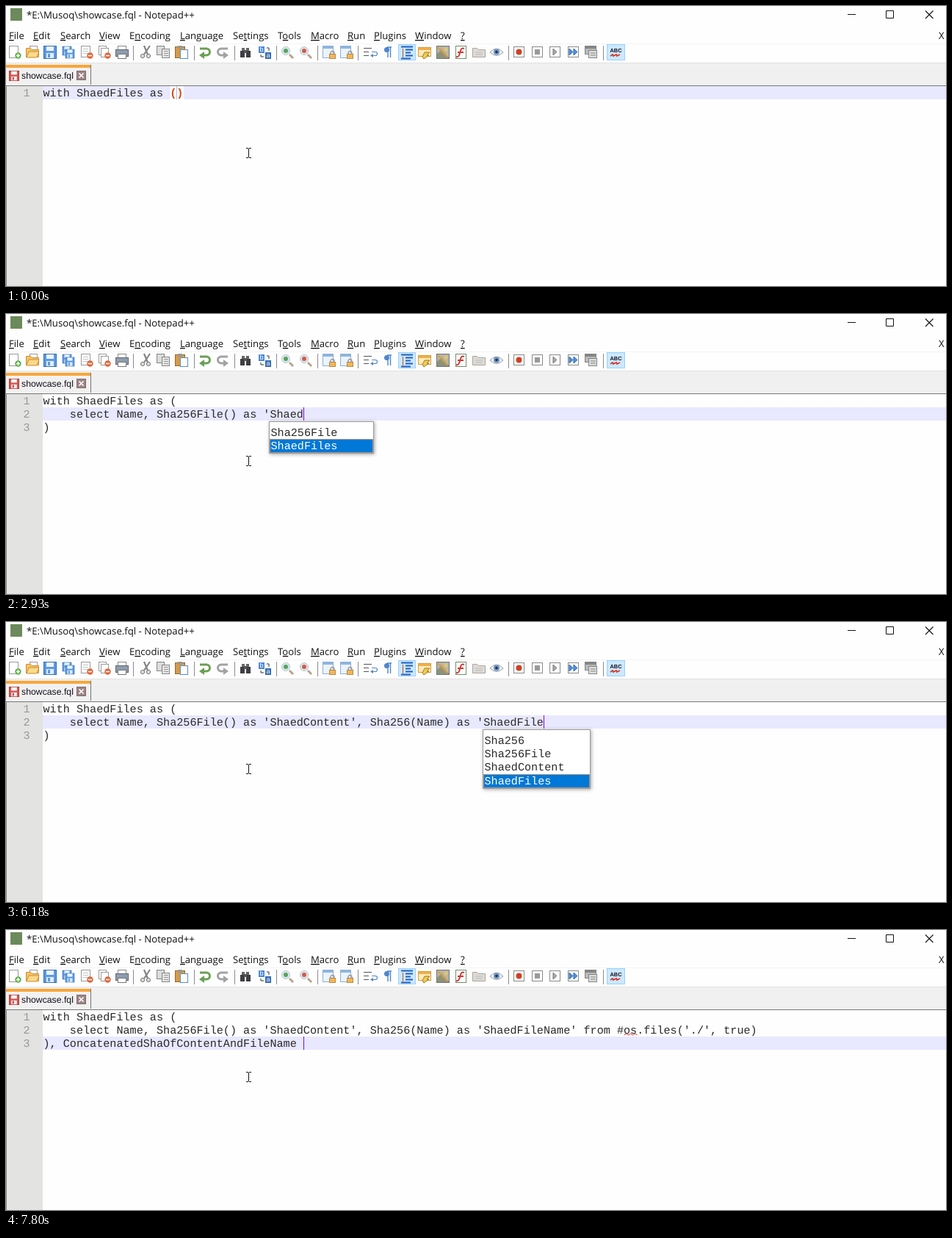
An HTML page that plays this animation: 1280x381 px, repeating every 8 s.

```html
<!DOCTYPE html>
<html lang="en">
<head>
<meta charset="utf-8">
<title>Typing a query</title>
<style>
  html, body { margin: 0; width: 100%; height: 100%; overflow: hidden; background: #fefefe; }
  svg { display: block; width: 1280px; height: 381px; }
  text { white-space: pre; text-rendering: geometricPrecision; }
  .ui { font: 13.1px "Open Sans", sans-serif; fill: #111; }
  .tab { font: 12.28px "Liberation Sans", sans-serif; fill: #15101c; }
  .code { font: 15.15px "Liberation Mono", monospace; fill: #2a2a2a; }
  .code.num { fill: #989898; }
  .code.brace { font-weight: bold; }
  .code.picked { fill: #fff; }
  .list { filter: drop-shadow(1px 1px 2.5px rgba(0, 0, 0, .35)); }
</style>
</head>
<body>
<svg viewBox="0 0 1280 381">
  <g id="chrome"></g>
  <g id="editor"></g>
  <path d="M327 193.5h3M331 193.5h3M330.5 194v12M327 206.5h3M331 206.5h3" fill="none" stroke="#111"/>
</svg>
<script>
const rect = (x, y, w, h, fill, stroke = 'none', more = '') =>
  `<rect x="${x}" y="${y}" width="${w}" height="${h}" fill="${fill}" stroke="${stroke}" ${more}/>`;
const path = (d, stroke, width = 1, fill = 'none') =>
  `<path d="${d}" fill="${fill}" stroke="${stroke}" stroke-width="${width}"/>`;
const shape = (d, fill, stroke = 'none') => path(d, stroke, 1, fill);
const dot = (x, y, r, fill, stroke = 'none') =>
  `<circle cx="${x}" cy="${y}" r="${r}" fill="${fill}" stroke="${stroke}"/>`;
const text = (x, y, s, cls, more = '') => `<text x="${x}" y="${y}" class="${cls}" ${more}>${s}</text>`;
const move = (x, y, s, scale = 1) => `<g transform="translate(${x} ${y}) scale(${scale})">${s}</g>`;

// ---- toolbar icons, each drawn around its own centre ----
const page = (x, y, w = 11, h = 14, c = '#9a9a9a', fill = '#fff') => rect(x + .5, y + .5, w, h, fill, c);
const lines = (x, y, w, n, c) => path(Array.from({ length: n }, (_, i) => `M${x} ${y + i * 3}h${w}`).join(''), c);
const disk = (c, edge) => rect(-8.5, -8.5, 17, 17, c, edge) + rect(-5, -8, 10, 6, '#eef4fb') + rect(-5, 1, 10, 7, '#e3ecf6') + rect(-3, 2, 3, 5, c);
const badge = (c, d) => dot(4.5, 4.5, 4.2, c) + path(d, '#fff', 1.6);
const folder = (c, edge) => shape('M-8.5 -5.5h6l2 2h9v10h-17z', c, edge);
const arrow = c => path('M-7 -5H2a4.3 4.3 0 0 1 0 9H-3', c, 3) + shape('M-1 -1v10l-7-5z', c);
const lens = c => path('M3 3l5 5', '#b5a58e', 3) + dot(-2, -2, 5.5, '#dbe7f0', '#b9c6d0') + dot(-2, -2, 3, c);
const lock = rect(-8.5, -8.5, 14, 16, '#eaf3fd', '#8fb0d4') + rect(-8, -8, 13, 3, '#8db5e0') +
  path('M2 3v-2a2.500 2.500 0 0 1 5 0v2', '#999', 1.4) + rect(.5, 2.5, 8, 6, '#f2b65a', '#b98a45');
const key = rect(-7.5, -7.5, 14, 14, '#fcfcfc', '#8b8b8b');
const small = (x, y, s, size, more = '') => text(x, y, s, 'tab', `style="font-size:${size}px;${more}"`);

const icons = [
  [12, page(-8, -9, 12, 16) + badge('#5db14a', 'M2 4.5h5M4.5 2v5')],
  [36, page(-4, -9, 10, 10) + folder('#f4c565', '#c98e35') + shape('M-5 -1h14l-3 8h-14z', '#fbd98a', '#c98e35')],
  [60, disk('#5b9be0', '#2f6fb8')],
  [85, move(-2, -2, disk('#5b9be0', '#2f6fb8'), .7) + move(2, 2, disk('#5b9be0', '#2f6fb8'), .7)],
  [110, page(-8, -9, 12, 15) + lines(-5, -4.5, 7, 3, '#c4c4c4') + badge('#e2663a', 'M2 4.5h5')],
  [134, page(-8, -9, 10, 12) + page(-5, -6, 10, 12) + badge('#e2663a', 'M2 4.5h5')],
  [158, rect(-5.5, -8.5, 11, 7, '#fff', '#888') + rect(-8.5, -3.5, 17, 9, '#8e9cac', '#5d6874') + rect(-5.5, 2.5, 11, 6, '#fff', '#777')],
  [190, path('M-2 -9l5 12M6 -9l-8 12', '#858585', 2.2) + dot(-4, 5, 2.6, '#ddd', '#777') + dot(4, 5, 2.6, '#ddd', '#777')],
  [214, page(-9, -9, 10, 12, '#858585', '#ddd') + page(-2, -5, 10, 12, '#858585', '#e6e6e6') + lines(1, -1.5, 6, 3, '#999')],
  [239, rect(-8.5, -7.5, 13, 15, '#d39b4d', '#9a6826') + rect(-5, -9, 6, 4, '#999') + page(-2, -4, 10, 12, '#5b8fc9')],
  [271, arrow('#699f52')],
  [295, `<g transform="scale(-1 1)">${arrow('#a2a2a2')}</g>`],
  [326, rect(-7, -2, 6, 9, '#3d3d42') + rect(1, -2, 6, 9, '#3d3d42') + rect(-5, -6, 4, 4, '#666') + rect(1, -6, 4, 4, '#666') + rect(-2, -3, 4, 4, '#555')],
  [352, rect(-8, -8, 8, 9, '#4b8ad2') + rect(1, 0, 8, 9, '#326db6') + small(-6.5, -1, 'b', 9, 'fill:#fff') + small(2.5, 7, 'a', 9, 'fill:#fff') + path('M-5 3v3h4M3 -6h3v4', '#333')],
  [383, lens('#58a554')],
  [408, lens('#d75a45')],
  [440, lock],
  [464, lock],
  [496, path('M-9 -5.5h11M-9 -.5h7M-9 4.5h7', '#555') + path('M2 -.5h5a2.5 2.5 0 0 1 0 5H2', '#5588c4', 1.2) + shape('M4 2v5l-4-2.5z', '#5588c4')],
  [520, path('M0 -7v14M3.5 -7v14M-1 -7h6', '#4d86cb', 1.4) + dot(-1.5, -3.5, 3.5, '#4d86cb')],
  [546, path('M-8 -7.5h16M-2 -3.5h10M-2 .5h7M-2 4.5h10M-8 8.5h13', '#235fc0', 2) + path('M-5.5 -5v12', '#c34a3c')],
  [570, rect(-8.5, -6.5, 17, 12, '#fdebb9', '#d99b3a') + rect(-8, -6, 16, 3, '#f0b04b') + shape('M-3 6l3-6h7l-4 4h3l-7 5z', '#f2cd4c', '#9b7a2e')],
  [595, rect(-8.5, -8.5, 17, 17, '#b4b7ab', '#737373') + shape('M-8 8V2l6-6 10 11v1z', '#8d9379') + path('M-7 -7l13 13', '#e59a3c', 2) + dot(4, -4, 2.5, '#e5c56a')],
  [619, page(-7, -9, 14, 17, '#6f8f6b') + path('M5 -5q-4-2-5 3l-2 6q-1 3-4 2M-4 0h8', '#d1372f', 2)],
  [644, folder('#dedbd6', '#aaa49c') + lines(-5, 0, 10, 2, '#bbb')],
  [668, shape('M-9 0q9-10 18 0q-9 9-18 0z', '#eef1f4', '#9b9b9b') + dot(0, -.5, 4, '#6a94c4') + dot(0, -.5, 1.8, '#1d2f4b')],
  [699, key + dot(-.5, -.5, 4, '#cf4123')],
  [724, key + rect(-4, -4, 7, 7, '#999')],
  [748, key + shape('M-3 -5l5 4.5-5 4.5z', '#aaa', '#777')],
  [773, key + shape('M-6 -5l5 4.5-5 4.5zM0 -5l5 4.5-5 4.5z', '#4f8fdc', '#2c67b0')],
  [797, rect(-8.5, -8.5, 15, 11, '#bbb', '#858585') + rect(-8, -8, 14, 3, '#858585') + rect(-3.5, -2.5, 11, 10, '#ddd', '#858585') + lines(-1, 1, 7, 2, '#888')],
  [830, small(-7.5, 0, 'ABC', 7.4, 'font-weight:bold') + path('M-7 5l3-2 1 2 4-2 1 2 4-2', '#d33a2f', 1.8)],
];

// label, left edge, index of the underlined letter
const menu = [['File', 4, 0], ['Edit', 37, 0], ['Search', 74, 0], ['View', 127, 0], ['Encoding', 168, 1],
  ['Language', 237, 0], ['Settings', 309, 2], ['Tools', 370, 1], ['Macro', 415, 0], ['Run', 465, 0],
  ['Plugins', 501, 0], ['Window', 557, 0], ['?', 619, 0]];

const underline = (s, i) =>
  `${s.slice(0, i)}<tspan text-decoration="underline">${s[i]}</tspan>${s.slice(i + 1)}`;

document.getElementById('chrome').innerHTML =
  rect(6, 3, 16, 17, '#6d8a5c') +
  text(28, 17, '*E:\\Musoq\\showcase.fql - Notepad++', 'ui', 'style="font-size:13.2px"') +
  path('M1146 11.5h11M1198.5 6.5h10v10h-10z', '#111') + path('M1252 6.5l10.5 10.5M1262.5 6.5l-10.5 10.5', '#111', 1.1) +
  menu.map(([s, x, i]) => text(x, 45, underline(s, i), 'ui')).join('') +
  text(1270, 45, 'X', 'ui') +
  path('M0 51.5h1280', '#f3f3f3') +
  rect(534.5, 52.5, 23, 21, '#cce8ff', '#99d1ff') + rect(818.5, 52.5, 24, 21, '#cce8ff', '#99d1ff') +
  path([173, 256, 311, 368, 424, 479, 684, 813].map(x => `M${x}.5 54v20`).join(''), '#8c8c8c') +
  icons.map(([x, s]) => move(x, 63, s)).join('') +
  rect(0, 78, 1280, 30, '#eff0ef') + path('M0 77.5h1280', '#e2e2e2') +
  rect(0, 80, 115, 28, '#f1f1f1') + rect(0, 80, 115, 4, '#f9a53a') + path('M115.5 80v27', '#747474') +
  move(11, 95, disk('#d9534a', '#a52a26'), .78) +
  text(21, 99, 'showcase.fql', 'tab') +
  rect(96.5, 88.5, 12, 12, '#9d8588', '#84696d') + path('M99.5 91.5l6 6M105.5 91.5l-6 6', '#fff', 1.7) +
  rect(0, 109, 50, 272, '#e3e4e2') + path('M0 108.5h1280', '#777') + path('M.5 108v273', '#8a8a8a');

// ---- editor ----
const LEFT = 50.5, CELL = 9.092, ROW = 18.2;
const HEAD = 'with ShaedFiles as (';
const QUERY = "    select Name, Sha256File() as 'ShaedContent', Sha256(Name) as 'ShaedFileName' from #os.files('./', true)";
const RED = '#f01408';
const shas = ['Sha256File', 'ShaedContent', 'ShaedFiles'];

const colX = c => LEFT + c * CELL;
const rowY = r => 109 + Math.round(r * ROW);

// at: [row, column] of the caret; hide: caret blinked off; marks: matched braces; pop: [column, picked, words]
const step = (t, rows, at, more) => ({ t, rows, at, marks: [], ...more });
const type = (t, n, more) => step(t, [HEAD, QUERY.slice(0, n), ')'], [1, n], more);
const outer = { marks: [[0, 19], [2, 0]], hide: true };

const steps = [
  step(0, [HEAD + ')'], [0, 20], { marks: [[0, 19], [0, 20]], ink: '#cf4a1c', caret: '#b9b9d8' }),
  step(330, [HEAD, ')'], [1, 0], { marks: [[0, 19], [1, 0]], hide: true }),
  step(650, [HEAD, '', ')'], [2, 1], outer),
  type(980, 17),
  type(1300, 20, { pop: [17, 0, ['ShaedFiles']] }),
  type(1620, 30),
  type(1940, 32, { pop: [30, 0, ['as']], caret: '#2b2060' }),
  type(2270, 34),
  type(2600, 37, { pop: [34, 0, ['Sha256File', 'ShaedFiles']] }),
  type(2930, 39, { pop: [34, 1, ['Sha256File', 'ShaedFiles']] }),
  type(3250, 49),
  type(3570, 55, { pop: [49, 0, shas], wave: [49, 3, '#e8743c'], caret: '#4a4ad0' }),
  type(3900, 56, { marks: [[1, 55], [2, 0]], hide: true }),
  type(4230, 58, { pop: [56, 0, ['Name']] }),
  type(4560, 62),
  type(4890, 64, { pop: [62, 0, ['as']] }),
  type(5210, 66),
  type(5530, 69, { pop: [66, 0, ['Sha256', ...shas]] }),
  type(5850, 71, { pop: [66, 2, ['Sha256', ...shas]] }),
  type(6180, 75, { pop: [66, 3, ['Sha256', ...shas]] }),
  type(6500, 91, { pop: [90, 0, ['from']] }),
  type(6830, 107, { marks: [[1, 95], [1, 106]], hide: true }),
  step(7150, [HEAD, QUERY, ')'], [2, 1], outer),
  step(7470, [HEAD, QUERY, '),', ''], [3, 0]),
  step(7800, [HEAD, QUERY, '), ConcatenatedShaOfContentAndFileName '], [2, 39]),
];

const drawWave = ([col, len, ink]) => {
  let d = `M${colX(col)} 143`;
  for (let i = 0; i < len * 3; i++) d += `l${CELL / 3} ${i % 2 ? 2 : -2}`;
  return path(d, ink);
};

const drawList = ([col, picked, words]) => {
  const x = Math.round(colX(col)) - 2 + .5;
  const w = words.includes('ShaedContent') ? 146 : 142;
  const top = i => 152.5 + Math.round(i * ROW);
  return rect(x, 146.5, w, 25 + Math.round((words.length - 1) * ROW), '#fff', '#999', 'class="list"') +
    rect(x + 1, top(picked), w - 2, 18, '#0078d7', '#d0702a', 'stroke-dasharray="1 1"') +
    words.map((s, i) => text(x + 2, top(i) + 13.5, s, i === picked ? 'code picked' : 'code')).join('');
};

function draw(s) {
  const [row, col] = s.at;
  let out = rect(50, rowY(row), 1230, 18, '#e8e8ff');
  s.rows.forEach((line, r) => {
    out += text(23.5, rowY(r) + 14, r + 1, 'code num');
    const hidden = s.marks.filter(m => m[0] === r).map(m => m[1]);
    const plain = [...line].map((ch, c) => hidden.includes(c) ? ' ' : ch).join('');
    out += text(LEFT, rowY(r) + 14, plain, 'code');
  });
  for (const [r, c] of s.marks) {
    out += rect(colX(c), rowY(r), CELL + .4, 18, '#fefefe') +
      text(colX(c), rowY(r) + 14, s.rows[r][c], 'code brace', `style="fill:${s.ink || RED}"`);
  }
  if (s.wave) out += drawWave(s.wave);
  if (s.rows[1] && s.rows[1].length > 88) out += drawWave([87, 2, '#e0302a']);
  if (!s.hide) out += rect(Math.floor(colX(col)), rowY(row), 1, 18, s.caret || '#8000ff');
  if (s.pop) out += drawList(s.pop);
  return out;
}

const editor = document.getElementById('editor');
const start = performance.now();
let shown = null;

function tick() {
  const t = (performance.now() - start) % 8000;
  const now = steps.findLast(s => s.t <= t) || steps[0];
  if (now !== shown) editor.innerHTML = draw(shown = now);
  requestAnimationFrame(tick);
}
tick();
</script>
</body>
</html>
```
